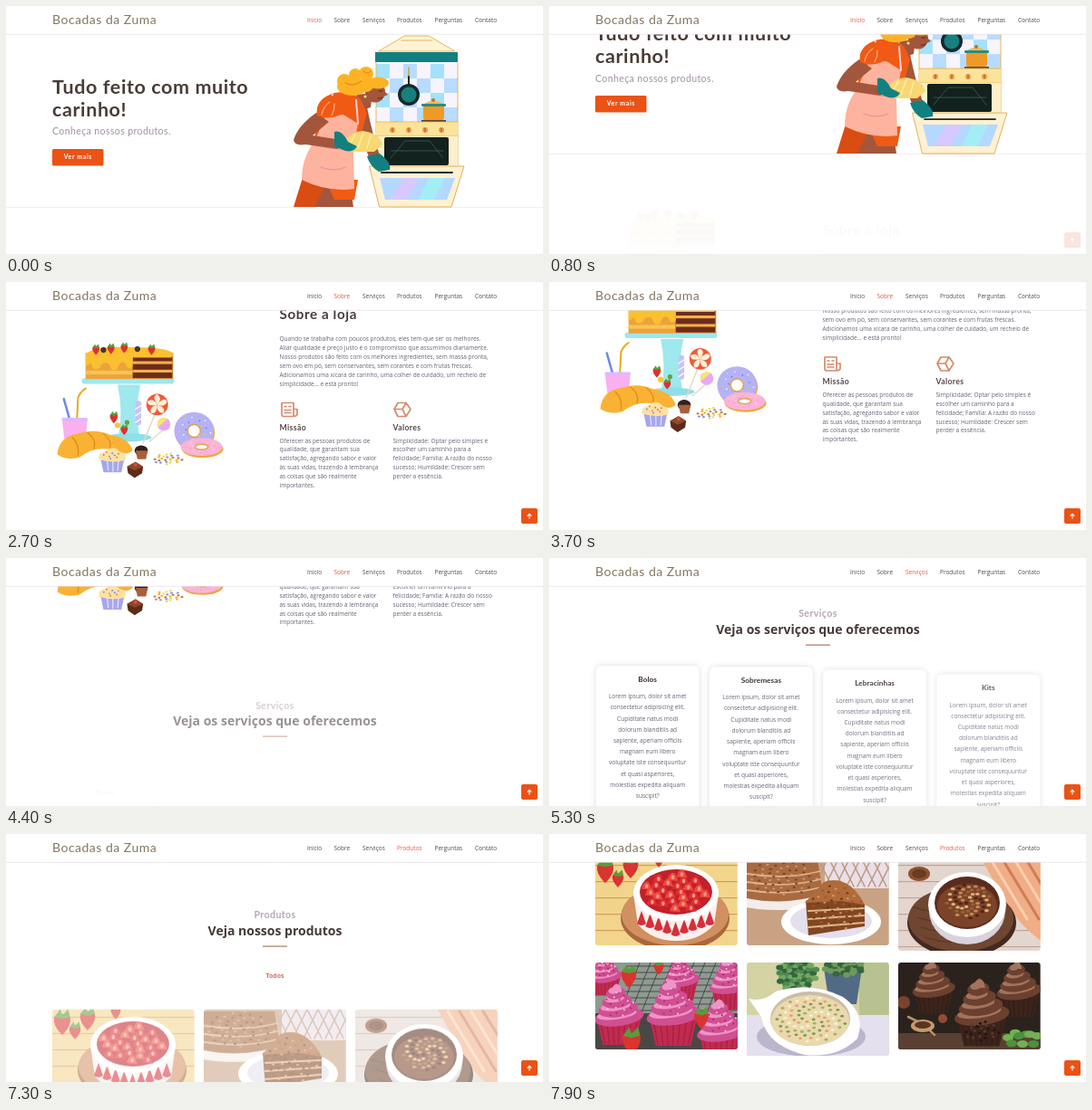
An HTML page for the animation above (8000 ms loop, 592 px wide and 274 px high).

```html
<!DOCTYPE html>
<html lang="pt">
<head>
<meta charset="utf-8">
<title>Bocadas da Zuma</title>
<style>
html, body { margin: 0; width: 100%; height: 100%; overflow: hidden; background: #fff; }
svg { display: block; width: 592px; height: 274px; }
text { font: 6.5px "Open Sans", sans-serif; fill: #686076; }
.brand { font: 14px Lato, sans-serif; letter-spacing: .5px; fill: #83765f; }
.nav { fill: #54484a; }
.nav.on { fill: #e5573f; }
.h1 { font: 700 21.5px Lato, sans-serif; letter-spacing: .6px; fill: #4a3c37; }
.lead { font: 10.6px Lato, sans-serif; letter-spacing: .36px; fill: #a290a5; }
.btn { font: 700 7px Lato, sans-serif; letter-spacing: .6px; fill: #fff; }
.h2 { font: 700 15.2px Lato, sans-serif; letter-spacing: .6px; fill: #4a3c42; }
.h3 { font: 700 8.7px Lato, sans-serif; letter-spacing: .35px; fill: #56474a; }
.h4 { font: 700 8.3px Lato, sans-serif; fill: #3c3234; }
.over { font: 700 10.6px Lato, sans-serif; letter-spacing: .4px; fill: #b5a6b4; }
.big { font: 700 14px "Open Sans", sans-serif; fill: #463a38; }
.tab { font: 700 7px "Open Sans", sans-serif; fill: #d8685c; }
.mid { text-anchor: middle; }
.card { fill: #fff; filter: drop-shadow(0 0 3px rgba(90, 60, 110, .2)); }
</style>
</head>
<body>
<svg id="stage" viewBox="0 0 592 274"></svg>
<script>
const T = (x, y, s, c = '') => `<text x="${x}" y="${y}" dy=".33em" class="${c}">${s}</text>`;
const lines = (x, y, step, list, c) => list.map((s, i) => T(x, y + i * step, s, c)).join('');
const R = (f, x, y, w, h, r = 0) => `<rect x="${x}" y="${y}" width="${w}" height="${h}" rx="${r}" fill="${f}"/>`;
const C = (f, x, y, rx, ry = rx) => `<ellipse cx="${x}" cy="${y}" rx="${rx}" ry="${ry}" fill="${f}"/>`;
const P = (f, d) => `<path d="${d}" fill="${f}"/>`;
const L = (c, w, d) => `<path d="${d}" fill="none" stroke="${c}" stroke-width="${w}" stroke-linecap="round" stroke-linejoin="round"/>`;
const G = (id, s) => `<g id="${id}">${s}</g>`;
const many = (n, f) => Array.from({ length: n }, (_, i) => f(i)).join('');
const rnd = n => { const v = Math.sin(n * 127.1 + 3) * 43758.5; return v - Math.floor(v); };
const scatter = (n, seed, x, y, rx, ry, f) => many(n, i => {
  const a = i * 2.4, d = Math.sqrt((i + .5) / n);
  return f(x + Math.cos(a) * d * rx + rnd(seed + i) * 2 - 1, y + Math.sin(a) * d * ry, i);
});
// Speckles cycling through a few colours.
const grain = (n, x, y, rx, ry, colors, w, h = w) =>
  scatter(n, n, x, y, rx, ry, (a, b, i) => C(colors[i % colors.length], a, b, w, h));
const berry = (x, y, s = 1) => `<g transform="translate(${x} ${y}) scale(${s})">` +
  P('#d9342f', 'M-4-3Q0-6 4-3Q5 1 0 6Q-5 1-4-3') + P('#5c9a3c', 'M-4-3L-1-7L0-4L3-7L4-3L0-2Z') + '</g>';

function stove() {
  return P('#fff3d4', 'M440 33H466L495 50H411Z') + L('#e4b65e', 1, 'M440 33H466L495 50H411Z M436 38H470') +
    R('#f7f4ff', 408, 61, 90, 68) +
    many(24, i => (i % 6 + (i / 6 | 0)) % 2 ? '' : R(i % 4 ? '#b8dcff' : '#a4e2fb', 408 + i % 6 * 15, 64 + (i / 6 | 0) * 16, 15, 16)) +
    R('#12807f', 407, 51, 91, 11) + L('#e4b65e', 1, 'M408 62V178M498 62V178') +
    L('#caa046', 1.5, 'M444 68V80') + L('#1b2b2f', 2, 'M444 78V88') + C('#17282d', 444, 98, 12) + C('#17807f', 444, 98, 8.5) +
    R('#ee9a25', 460, 110, 23, 16, 2) + R('#2b8b85', 458, 108, 27, 3, 1) + P('#f3bc55', 'M461 108Q471 101 482 108Z') +
    C('#c66d18', 471, 104, 2) + R('#53443c', 458, 126, 27, 2) +
    R('#fce39a', 408, 128, 90, 16) + L('#e2ad4c', .8, 'M408 128H498M408 144H498') +
    many(4, i => C('#ec9c4a', 426 + i * 18, 137, 3) + L('#9c5526', 1, `M${426 + i * 18} 135v4`)) +
    R('#fff0cb', 408, 144, 90, 34) + R('#13211f', 417, 145, 71, 31, 2) + L('#3c6156', .8, 'M424 168L440 149H467L482 168M424 160H482') +
    P('#fff1d2', 'M401 177H505L491 222H412Z') + L('#e0b05c', 1, 'M401 177H505L491 222H412Z') +
    P('#b4d8ff', 'M412 190H495L486 214H418Z') + P('#d6c9ff', 'M438 190H455L443 214H424Z') + P('#a3eef5', 'M466 190H484L472 214H455Z') +
    L('#262326', 1.8, 'M414 184H492');
}

function cook() {
  const skin = '#a3563b', dress = '#f05a14', hair = '#fbb324', glove = '#128080', apron = '#fdb39d';
  return P(skin, 'M346 190L338 222H383L379 194Z') + P('#d94c12', 'M330 180L317 222H340L354 194Z') +
    P(dress, 'M352 192H388L384 214H362Z') +
    P(skin, 'M386 98L404 96L402 112L390 116Z') + P(skin, 'M388 120L398 112Q404 142 412 165L402 172Q392 148 388 120') +
    P(dress, 'M343 112C350 94 376 90 391 103L398 118L389 152L340 152Z') +
    P(apron, 'M340 150L352 122L372 120L388 130L383 160L384 202Q354 206 326 192Q326 168 340 150') +
    L('#f9d0e4', 2, 'M352 122L360 98M388 130L386 104') + L('#e98aa6', 1, 'M338 152Q360 160 384 158M347 178Q362 184 374 178') +
    P(skin, 'M342 118Q322 132 317 148Q318 155 330 153L366 158L370 148L338 143L356 128Z') +
    P(dress, 'M343 121Q342 100 361 99Q371 105 367 121Q354 126 343 121') + L('#ffc39c', 1, 'M348 120Q350 110 357 106M359 121Q363 114 362 108') +
    P('#f7d873', 'M371 156Q376 139 394 138Q412 141 415 153L406 161H382Z') + L('#fff0b1', 1.3, 'M379 153L385 142M388 156L394 140M398 157L402 143') +
    P(glove, 'M362 139Q370 136 377 150L387 155Q384 162 374 160L362 155Z') +
    P(glove, 'M398 166L412 163Q425 173 423 181L411 183Q401 177 398 166') +
    C(hair, 382, 89, 17, 10) + C(hair, 373, 83, 8) + C(skin, 407, 95, 11, 11.5) + P(skin, 'M415 92L421 98L414 101Z') +
    C(hair, 397, 75, 8) + C(hair, 385, 76, 7) + C(hair, 410, 85, 12, 6.5) + C(hair, 397, 88, 8, 7) +
    L('#e27b15', 1, 'M374 85Q382 90 392 83M394 72Q399 76 402 72') + L('#3a2119', .8, 'M411 94h4M410 102q3 1 5-1') + C('#f7db76', 396, 100, 1.6);
}

function sweets() {
  const gold = '#f9b233', ring = (x, y, rx, ry, c, hx, hy, bits) =>
    C('#f0a63c', x + 1, y + 2, rx, ry) + C(c, x, y, rx, ry) + grain(22, x, y, rx - 3, ry - 3, bits, .8) +
    C('#e0a44e', x, y, hx + 1.5, hy + 1.5) + C('#fff', x, y, hx, hy);
  return P('#9ee8ee', 'M124 152H148Q142 180 147 206H125Q130 180 124 152') + C('#8fdfe8', 136, 208, 24, 4.5) +
    R('#9ae9f0', 86, 145, 98, 6, 3) +
    P('#eda23c', 'M90 118H183V146H90Z') + R('#f7c552', 90, 137, 50, 4) +
    R('#6e2d1c', 140, 122, 42, 23) + R('#f5b14a', 140, 127, 42, 3) + R('#f5b14a', 140, 136, 42, 3) +
    P('#fbc02f', 'M90 120Q96 111 136 112Q178 112 183 119L181 123H140V132Q135 138 132 129Q126 126 124 135Q118 140 115 130Q108 126 105 134Q98 139 96 129L90 133Z') +
    [101, 117, 131, 160].map((x, i) => berry(x, 115 - i % 3, .9)).join('') + C('#47332e', 109, 115, 3) + C('#47332e', 145, 114, 3) +
    L('#6f8be0', 2.4, 'M67 167L74 192') + L('#e4ad2b', 2, 'M80 208L82 166Q84 160 90 156') +
    P('#f9b0f0', 'M65 188H92L89 222H69Z') + R('#e0b8ff', 65, 187, 27, 4, 1) +
    P(gold, 'M60 226Q62 207 82 204Q99 198 116 205Q136 208 140 222Q134 228 122 222Q100 216 84 229Q70 233 60 226') +
    L('#dd8a18', 1.2, 'M76 208Q84 216 82 227M92 203Q102 210 99 220M109 204Q118 211 116 219') +
    L('#c9c0ff', 6, 'M146 172V192') + L('#fff', 1.2, 'M143 178L149 174M143 185L149 181M143 192L149 188') +
    L('#e6d7c4', 1.4, 'M164 182L151 214M172 200L158 212') +
    C('#f05a3c', 166, 173, 11.5) + many(5, i => `<path d="M166 173Q172 166 166 162Q160 164 166 173" fill="#fff0d6" transform="rotate(${i * 72} 166 173)"/>`) +
    C('#e6a9f4', 173, 194, 7) + P('#f7e66d', 'M167 197A7 7 0 0 1 177 188Z') +
    berry(120, 187) + berry(131, 200, .9) + C('#f6c733', 124, 195, 3) + C('#65a43c', 134, 192, 2.5) +
    ring(205, 201, 21, 20, '#b5b2f5', 6, 6, ['#fff', '#5a7fd8', '#f7d04c']) + ring(213, 218, 22, 9.5, '#f9b4d6', 6, 2, ['#fbd0e6', '#f59ac4']) +
    C('#2e211f', 149, 222, 7, 5.5) + P('#a95f37', 'M143 222H156L154 231H145Z') +
    P('#a6a6ef', 'M106 231H131L128 245H109Z') + L('#fff', .8, 'M113 233l1 10M119 233v11M125 233l-1 10') +
    P('#ffe2a0', 'M104 231Q103 224 111 223Q119 215 126 223Q134 224 132 232Q118 236 104 231') +
    grain(8, 118, 227, 11, 4, ['#6a8ae0', '#ef6a83'], .9) +
    P('#5c2b1a', 'M134 239L143 234L151 239L150 246L142 251L135 246Z') + P('#8a4a2a', 'M134 239L143 234L151 239L142 243Z') + C('#e1493b', 143, 237, 2) +
    grain(24, 177, 231, 16, 6, ['#f6b32d', '#c47b36', '#8795e8', '#f3d85c'], 1.5, 1.1);
}

const cupcake = (x, y, s, top, light, cup) => `<g transform="translate(${x} ${y}) scale(${s})">` +
  P(cup, 'M-22 4H22L16 30H-16Z') + many(7, i => L('#0003', 1, `M${i * 6 - 18} 8L${i * 4.6 - 14} 29`)) +
  many(4, i => `<g transform="rotate(-8)">${C(top, 0, 2 - i * 8, 25 - i * 5, 9 - i)}${C(light, -2, -1 - i * 8, 20 - i * 5, 5 - i * .6)}</g>`) +
  P(light, 'M-9-23Q-4-33-1-31Q3-29 3-23Z') + '</g>';

const planks = (x, y, c, d) => R(c, x, y, 158, 104) + many(6, i => R(d, x, y + 8 + i * 18, 158, 1.2));

const strawberryCake = planks(51, 890, '#f3d48c', '#cf9f58') + C('#a9673c', 139, 957, 60, 36) + C('#d09060', 139, 953, 59, 34) +
  P('#fbeeee', 'M93 930H187L182 964Q166 982 140 982Q114 982 98 964Z') +
  many(9, i => P('#d5303a', `M${97 + i * 9.4} ${975 - Math.abs(i - 4) * 3}l5-14l5 14q-5 4-10 0`)) +
  C('#fff', 140, 929, 47, 31) + C('#c2202a', 140, 928, 40, 25) +
  scatter(26, 3, 140, 928, 35, 21, (x, y, i) => P(i % 2 ? '#f0483f' : '#e02c33', `M${x - 6} ${y + 3}Q${x - 4} ${y - 6} ${x + 2} ${y - 5}L${x + 6} ${y + 4}Z`) + C('#f79a86', x, y, 1.8, 2.4)) +
  berry(62, 905, 2.2) + berry(90, 901, 2) + berry(76, 914, 1.5) + berry(121, 893, 1.3);

const layerCake = R('#c9a283', 218, 890, 157, 97) + R('#eadfe6', 304, 890, 71, 34) +
  many(7, i => L('#bd9c86', 1.6, `M${308 + i * 12} 890l-16 32M${296 + i * 12} 890l16 32`)) +
  C('#f4ecea', 252, 934, 58, 14) + P('#a86a40', 'M218 892H296L302 930Q262 944 218 935Z') +
  many(3, i => L('#e0b489', 1.8, `M218 ${908 + i * 9}Q262 ${915 + i * 9} 299 ${905 + i * 9}`)) +
  grain(60, 258, 912, 38, 20, ['#7d4726', '#cf9463'], 1.7, 1.1) +
  C('#fff', 311, 961, 55, 25) + C('#e4dfec', 311, 960, 45, 19) + P('#824621', 'M283 938L326 918L348 942V966L286 976Z') +
  P('#b06b3b', 'M282 940L303 917Q330 908 348 942L322 938Z') +
  many(3, i => L('#e2b687', 2, `M286 ${949 + i * 9}L347 ${946 + i * 8}`)) +
  grain(50, 316, 946, 29, 25, ['#d39460', '#6b381b', '#9c5a30'], 1.6, 1.1);

const chocolateBowl = planks(385, 890, '#e4d5ce', '#bda594') + P('#f0ad86', 'M476 890H542V982Q515 962 498 930Z') +
  many(4, i => L(i % 2 ? '#cf7c58' : '#fbd0b0', 3, `M${487 + i * 13} 892L${527 + i * 13} 958`)) +
  C('#432a20', 455, 962, 60, 38) + C('#6f4630', 454, 958, 58, 36) + many(4, i => L('#573423', 1, `M${402 + i * 4} ${945 + i * 11}q24 8 45 5`)) +
  C('#d9d2dc', 461, 949, 42, 37) + C('#fff', 461, 942, 43, 36) + C('#5b2c1d', 461, 940, 36, 29) + C('#7b4329', 461, 943, 33, 24) +
  grain(55, 463, 938, 25, 19, ['#c58a52', '#4f2619', '#e0b170', '#96603a'], 2.4, 1.6) + C('#8c5230', 408, 908, 12, 8) + C('#6b3a22', 408, 908, 8, 5);

const pinkCupcakes = R('#8f9a91', 51, 1006, 157, 96) + R('#4c4747', 51, 1062, 157, 42) +
  many(10, i => L('#3d4040', .9, `M${100 + i * 12} 1006l-24 60M85 ${1010 + i * 7}H208`)) +
  [[62, 1020, .75], [146, 1024, .8], [200, 1030, .95], [77, 1064, 1.1], [190, 1081, 1.1], [137, 1062, 1.2]].map(([x, y, s]) =>
    cupcake(x, y, s, '#cf4f92', '#f093c6', '#c22a50') + grain(16, x, y - 10 * s, 17 * s, 13 * s, ['#a82c66', '#fbc4e0'], 1)).join('') +
  berry(88, 1022, 2) + berry(168, 1068, 1.9) + berry(91, 1094, 2.4) + berry(121, 1012, 1.3);

const soup = R('#d3d3a4', 218, 1006, 157, 103) + R('#b7c290', 342, 1006, 33, 60) + R('#e4e0ee', 218, 1064, 157, 45) +
  R('#3c5254', 258, 1022, 30, 26, 3) + P('#536a86', 'M303 1012H345L339 1052H309Z') +
  grain(50, 273, 1019, 22, 18, ['#72a760', '#33663d', '#4f8a50'], 4, 3) + grain(34, 325, 1011, 22, 9, ['#6c9a5b', '#36653b'], 4, 3) +
  C('#bdb5cb', 289, 1088, 60, 22) + P('#fff', 'M220 1046Q236 1050 250 1038Q288 1026 324 1044Q350 1062 340 1090Q318 1112 282 1108Q240 1098 234 1066Z') +
  C('#c9bfa8', 288, 1068, 44, 30) + C('#ead9ae', 288, 1070, 43, 28) +
  grain(80, 288, 1069, 39, 25, ['#7f9c4c', '#e3a56c', '#fbf0cf', '#a8b060'], 2, 1.4);

const darkCupcakes = R('#2b221e', 385, 1006, 157, 96) + R('#5a4032', 385, 1084, 157, 20) +
  [[424, 1034, .95], [518, 1036, 1], [477, 1062, 1.22]].map(([x, y, s]) => cupcake(x, y, s, '#6b402f', '#a3735a', '#3b241b')).join('') +
  grain(24, 477, 1082, 20, 11, ['#5c3a2a', '#24140f'], 1.5) +
  L('#b7936a', 2.5, 'M396 1066Q414 1074 425 1086') + C('#c79a6c', 412, 1076, 13, 7) + C('#5b3524', 412, 1075, 9, 4) +
  many(9, i => C(i % 2 ? '#4d913f' : '#70b254', 506 + i * 4, 1089 + Math.sin(i * 2) * 7, 6, 4)) + C('#934b35', 434, 1068, 5) + C('#7b4230', 391, 1050, 7);

const photos = [[51, 890, 97, strawberryCake], [218, 890, 97, layerCake], [385, 890, 103, chocolateBowl],
  [51, 1006, 96, pinkCupcakes], [218, 1006, 103, soup], [385, 1006, 96, darkCupcakes]];
const photo = ([x, y, h, art], i) =>
  `<clipPath id="clip${i}">${R('#000', x, y, 156.7, h, 3)}</clipPath><g clip-path="url(#clip${i})">${art}</g>`;

const lorem = ['Lorem ipsum, dolor sit amet', 'consectetur adipisicing elit.', 'Cupiditate natus modi', 'dolorum blanditiis ad',
  'sapiente, aperiam officiis', 'magnam eum libero', 'voluptate iste consequuntur', 'et quasi asperiores,', 'molestias expedita aliquam', 'suscipit?'];
const card = (name, i) => {
  const x = 108.7 + i * 125.2;
  return G('card' + i, `<rect class="card" x="${x - 57}" y="579" width="114" height="166" rx="6"/>` +
    T(x, 594, name, 'h4 mid') + lines(x, 613, 12.22, lorem, 'mid'));
};
const title = (id, y, over, big) => G(id, T(296.5, y, over, 'over mid') + T(296.5, y + 17.5, big, 'big mid') + R('#a8795c', 283, y + 33.5, 27, 1.2));
const nav = [['Início', 332], ['Sobre', 361.5], ['Serviços', 393], ['Produtos', 431], ['Perguntas', 472.5], ['Contato', 517]];

document.getElementById('stage').innerHTML = R('#fff', 0, 0, 592, 274) + G('page',
  R('#f7e6f7', 0, 222, 592, .8) +
  lines(51, 90, 24.5, ['Tudo feito com muito', 'carinho!'], 'h1') + T(51, 139, 'Conheça nossos produtos.', 'lead') +
  R('#ea5216', 51, 158, 56.5, 18.5, 1.5) + T(79.3, 167, 'Ver mais', 'btn mid') + stove() + cook() +
  G('sweets', sweets()) +
  G('about', T(301.5, 262.5, 'Sobre a loja', 'h2') + lines(301.5, 289.3, 10, [
    'Quando se trabalha com poucos produtos, eles tem que ser os melhores.',
    'Aliar qualidade e preço justo é o compromisso que assumimos diariamente.',
    'Nosso produtos são feito com os melhores ingredientes, sem massa pronta,',
    'sem ovo em pó, sem conservantes, sem corantes e com frutas frescas.',
    'Adicionamos uma xícara de carinho, uma colher de cuidado, um recheio de',
    'simplicidade... e está pronto!'])) +
  G('mission', L('#d58b6c', 1.7, 'M304 360H317V375H306Q304 375 304 372ZM317 367H321V373Q320 375 317 375M307 364H309M307 368H314M307 371H314M312 364H314') +
    T(301.5, 387.5, 'Missão', 'h3') + lines(301.5, 402, 9.8, ['Oferecer às pessoas produtos de', 'qualidade, que garantam sua',
      'satisfação, agregando sabor e valor', 'às suas vidas, trazendo à lembrança', 'as coisas que são realmente', 'importantes.'])) +
  G('values', L('#d58b6c', 1.7, 'M432 360H441L446 367L441 375H432L428 367ZM428 367H437L441 360M437 367L441 375') +
    T(426.5, 387.5, 'Valores', 'h3') + lines(426.5, 402, 9.8, ['Simplicidade: Optar pelo simples é', 'escolher um caminho para a',
      'felicidade; Família: A razão do nosso', 'sucesso; Humildade: Crescer sem', 'perder a essência.'])) +
  title('services', 522, 'Serviços', 'Veja os serviços que oferecemos') +
  ['Bolos', 'Sobremesas', 'Lebracinhas', 'Kits'].map(card).join('') +
  title('products', 807, 'Produtos', 'Veja nossos produtos') + G('filter', T(296.5, 872.5, 'Todos', 'tab mid')) +
  G('photos', photos.map(photo).join(''))) +
  R('#fff', 0, 0, 592, 31) + R('#e6e1e8', 0, 30.8, 592, .8) + T(51, 15, 'Bocadas da Zuma', 'brand') +
  nav.map(([s, x]) => T(x, 15.5, s, 'nav')).join('') +
  G('up', R('#ea5216', 568, 250, 18, 17, 2) + L('#fff', 1.1, 'M577 261V256.5M575 258.3L577 256.2L579 258.3'));

const $ = id => document.getElementById(id);
const items = [...document.querySelectorAll('.nav')];
const scrollKeys = [[0, 0], [700, 37], [1170, 140], [1700, 176], [3700, 277], [3870, 297], [4200, 362], [5300, 460],
  [6100, 592], [6420, 647], [6650, 671], [7300, 717], [7900, 864], [8001, 888.5]];
const reveals = { about: 700, mission: 1170, values: 1270, services: 3870, card0: 4300, card1: 4400, card2: 4500, card3: 4600,
  products: 6050, filter: 6420, photos: 6770 };
const ease = p => (1 - Math.cos(Math.PI * Math.min(1, Math.max(0, p)))) / 2;

function scrollAt(t) {
  const i = scrollKeys.findIndex(k => k[0] > t), [t0, s0] = scrollKeys[i - 1], [t1, s1] = scrollKeys[i];
  return s0 + (s1 - s0) * (t - t0) / (t1 - t0);
}

function draw(now) {
  const t = Math.floor(now % 8000 / 100) * 100, s = scrollAt(t);
  $('page').setAttribute('transform', `translate(0 ${-s})`);
  for (const id in reveals) {
    const e = ease((t - reveals[id]) / 1000);
    $(id).setAttribute('opacity', e);
    $(id).setAttribute('transform', `translate(0 ${46 * (1 - e)})`);
  }
  const q = ease((t - 1700) / 900);
  $('sweets').setAttribute('opacity', ease((t - 700) / 1000));
  $('sweets').setAttribute('transform', `translate(147.5 ${427 + 16 * q}) scale(${1 + .04 * q}) translate(-147.5 -251)`);
  const active = [130, 398, 681].filter(y => s >= y).length;
  items.forEach((el, i) => el.classList.toggle('on', i === active));
  $('up').setAttribute('opacity', ease((t - 700) / 400));
  requestAnimationFrame(draw);
}
requestAnimationFrame(draw);
</script>
</body>
</html>
```
